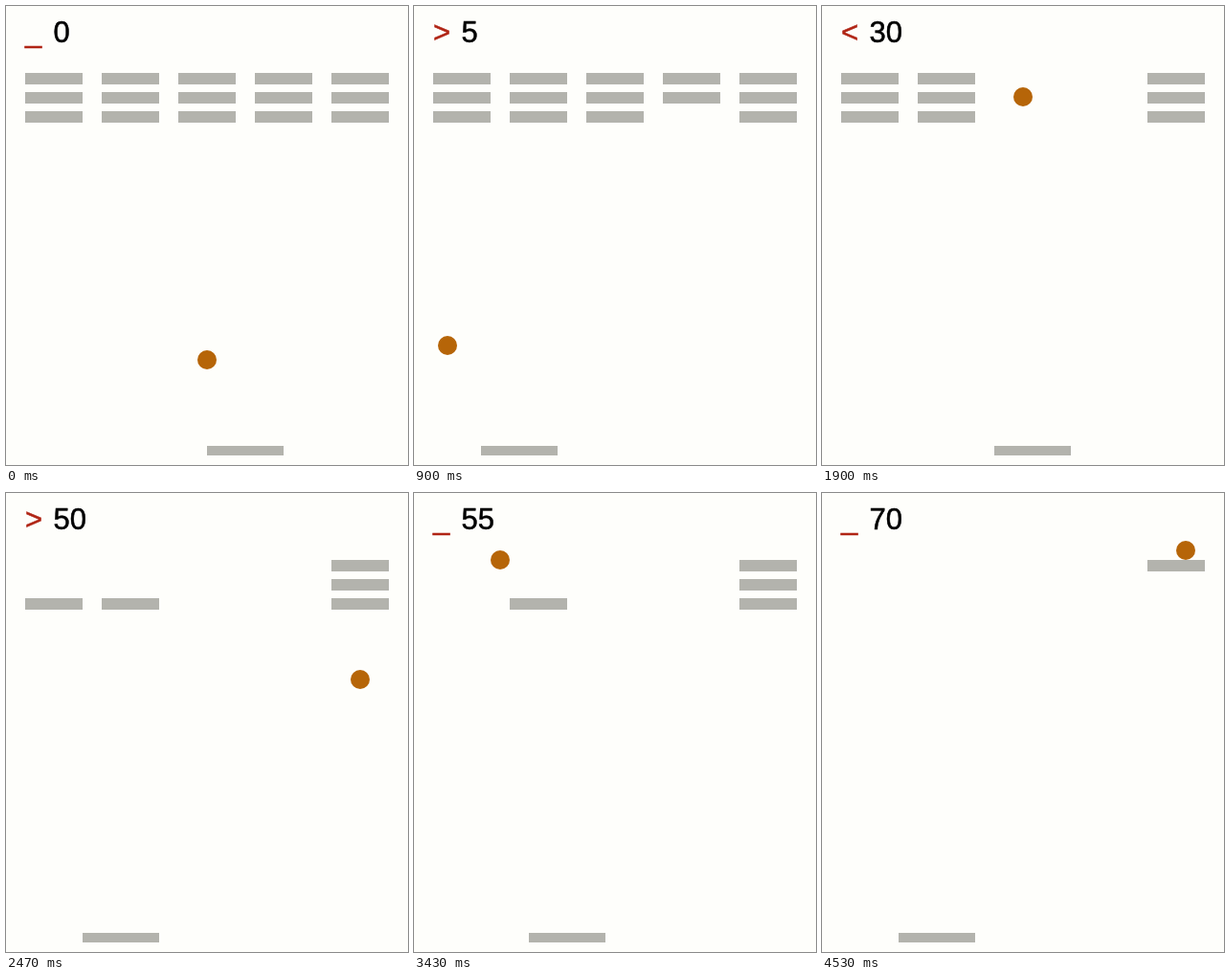
Animation of 420x480 px, one loop 4560 ms. Source, as an HTML page with a canvas:

```html
<!DOCTYPE html>
<html lang="en">
<head>
<meta charset="utf-8">
<title>Brick game</title>
<style>
  html, body { margin: 0; width: 100%; height: 100%; overflow: hidden; background: #fefefb; }
  canvas { display: block; }
</style>
</head>
<body>
<canvas id="stage" width="420" height="480"></canvas>
<script>
const ctx = document.getElementById('stage').getContext('2d');
const LOOP = 4560, STEPS = 137, RADIUS = 10, REACH = 9.9;
const LEFT = 10, RIGHT = 405, TOP = 10, FLOOR = 450;

// Each flight turns back at the listed walls, at an even speed per axis
const flights = [
  { end: 16, x: [210, RIGHT, 200], y: [370, FLOOR, 120, 185] },
  { end: 38, x: [200, LEFT, 85, LEFT, 395], y: [185, FLOOR, 110, 230] },
  { end: 57, x: [395, RIGHT, 195, RIGHT, 210], y: [230, FLOOR, 80, 110, 95] },
  { end: 74, x: [210, LEFT, 370], y: [95, TOP, 95, TOP, 95, TOP, 195] },
  { end: 103, x: [370, RIGHT, 200, RIGHT, LEFT, 90], y: [195, FLOOR, TOP, 105, TOP, 70] },
  { end: 136, x: [90, RIGHT, LEFT, 380], y: [70, 115, TOP, FLOOR, TOP, 60] }
];

// Paddle stops: [step, left edge]
const paddleStops = [
  [0, 210], [12, 210], [16, 220], [24, 60], [38, 120], [50, 200], [57, 180],
  [70, 60], [74, 80], [82, 180], [98, 120], [103, 120], [118, 80], [136, 80]
];

const clamp = (v, low, high) => Math.max(low, Math.min(high, v));
const snap = (v, grid) => Math.round(v / grid) * grid;

function along(route, k) {
  const gap = i => Math.abs(route[i] - route[i - 1]);
  let left = k * route.reduce((sum, _, i) => i ? sum + gap(i) : 0, 0);
  let i = 1;
  while (i < route.length - 1 && left > gap(i)) left -= gap(i++);
  return route[i - 1] + Math.sign(route[i] - route[i - 1]) * left;
}

function ballAt(step) {
  const i = flights.findIndex(flight => step <= flight.end);
  const start = i ? flights[i - 1].end : 0;
  const { end, x, y } = flights[i];
  const k = (step - start) / (end - start);
  return { x: along(x, k), y: along(y, k) };
}

function paddleAt(step) {
  const i = Math.max(1, paddleStops.findIndex(stop => step <= stop[0]));
  const [t0, x0] = paddleStops[i - 1], [t1, x1] = paddleStops[i];
  return x0 + (x1 - x0) * clamp((step - t0) / (t1 - t0), 0, 1);
}

const bricks = [];
for (let x = 20; x < 400; x += 80) {
  for (let y = 70; y < 120; y += 20) bricks.push({ x, y, w: 60, h: 12, hitAt: Infinity });
}

// Play once to learn when the ball touches each brick
for (let tick = 0; tick <= (STEPS - 1) * 32; tick++) {
  const step = tick / 32, ball = ballAt(step);
  for (const brick of bricks) {
    const dx = ball.x - clamp(ball.x, brick.x, brick.x + brick.w);
    const dy = ball.y - clamp(ball.y, brick.y, brick.y + brick.h);
    if (Math.hypot(dx, dy) < REACH) brick.hitAt = Math.min(brick.hitAt, step);
  }
}

function label(text, x, color) {
  ctx.fillStyle = ctx.strokeStyle = color;
  ctx.fillText(text, x, 37.5);
  ctx.strokeText(text, x, 37.5);
}

function draw(step) {
  ctx.fillStyle = '#fefefb';
  ctx.fillRect(0, 0, 420, 480);

  const standing = bricks.filter(brick => brick.hitAt > step);
  ctx.fillStyle = '#b3b3ad';
  for (const { x, y, w, h } of standing) ctx.fillRect(x, y, w, h);
  ctx.fillRect(snap(paddleAt(step), 10), 460, 80, 10);

  const ball = ballAt(step);
  ctx.fillStyle = '#b66508';
  ctx.beginPath();
  ctx.arc(snap(ball.x, 5), snap(ball.y, 5), RADIUS, 0, Math.PI * 2);
  ctx.fill();

  ctx.font = '31px "Liberation Sans", Arial, sans-serif';
  ctx.lineWidth = 0.5;
  const move = Math.sign(paddleAt(step) - paddleAt(step - 1));
  label('<_>'[move + 1], 20, '#b02414');
  label((bricks.length - standing.length) * 5, 49.5, '#000');
}

function frame() {
  const time = performance.now() % LOOP;
  // 30 steps per second, shown on 10 ms marks
  draw(Math.floor((Math.floor(time / 10) * 10 + 4) * 0.03));
  requestAnimationFrame(frame);
}
frame();
</script>
</body>
</html>
```
